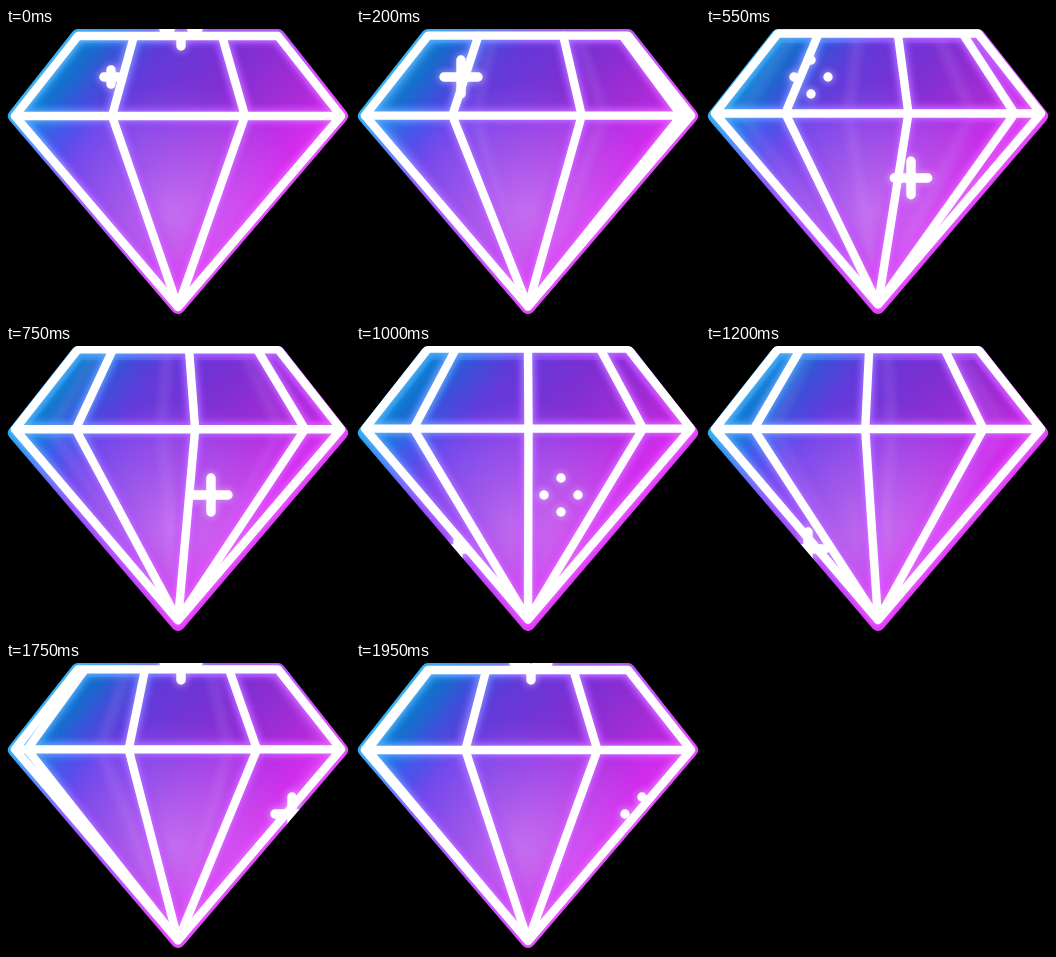
Recreate the animation shown at these times as an HTML page. Size 344 by 289 pixels, loop 2 s.

```html
<!DOCTYPE html>
<html lang="en">
<head>
<meta charset="utf-8">
<title>Spinning diamond</title>
<style>
  html, body { margin: 0; width: 100%; height: 100%; overflow: hidden; background: #000; }
  svg { display: block; width: 100vw; height: 100vh; }
  path { fill: none; stroke-linecap: round; stroke-linejoin: round; }
</style>
</head>
<body>
<svg viewBox="0 0 344 289" preserveAspectRatio="none">
  <defs>
    <linearGradient id="hue" gradientUnits="userSpaceOnUse" x1="43" y1="34" x2="242" y2="192">
      <stop offset="0" stop-color="#0aa2e6"/>
      <stop offset=".1" stop-color="#147cdc"/>
      <stop offset=".2" stop-color="#4458ea"/>
      <stop offset=".32" stop-color="#6c42ea"/>
      <stop offset=".57" stop-color="#8c36e2"/>
      <stop offset=".8" stop-color="#b232e2"/>
      <stop offset="1" stop-color="#d82cf0"/>
    </linearGradient>
    <linearGradient id="rim" gradientUnits="userSpaceOnUse" x1="43" y1="34" x2="242" y2="192">
      <stop offset="0" stop-color="#18a8f0"/>
      <stop offset=".15" stop-color="#3c84fc"/>
      <stop offset=".35" stop-color="#8a4cff"/>
      <stop offset=".7" stop-color="#b83cff"/>
      <stop offset="1" stop-color="#e034fa"/>
    </linearGradient>
    <linearGradient id="shade" x1="0" y1="0" x2="0" y2="1">
      <stop offset="0" stop-color="#200060" stop-opacity=".14"/>
      <stop offset=".27" stop-color="#200060" stop-opacity=".1"/>
      <stop offset=".34" stop-color="#200060" stop-opacity="0"/>
    </linearGradient>
    <radialGradient id="light" gradientUnits="userSpaceOnUse" cx="168" cy="185" r="130">
      <stop offset="0" stop-color="#e0b0ff" stop-opacity=".46"/>
      <stop offset="1" stop-color="#e0b0ff" stop-opacity="0"/>
    </radialGradient>
    <filter id="soft" filterUnits="userSpaceOnUse" x="-20" y="-20" width="384" height="329">
      <feGaussianBlur stdDeviation="3"/>
    </filter>
    <mask id="body" maskUnits="userSpaceOnUse" x="0" y="0" width="344" height="289">
      <path class="gem" style="fill:#fff" stroke="#fff" stroke-width="14"/>
    </mask>
  </defs>
  <rect width="344" height="289" fill="#000"/>
  <path class="gem" style="fill:url(#hue)" stroke="url(#rim)" stroke-width="14"/>
  <path class="gem" style="fill:url(#shade)"/>
  <path class="gem" style="fill:url(#light)"/>
  <g mask="url(#body)">
    <path id="back" stroke="#d9a8ff" stroke-width="12" opacity=".13" filter="url(#soft)"/>
    <g filter="url(#soft)">
      <path class="edges" stroke="url(#rim)" stroke-width="17" opacity=".8"/>
      <path class="edges" stroke="#fff" stroke-width="9" opacity=".3"/>
      <path class="sparks" stroke="#e0b8ff" stroke-width="13" opacity=".5"/>
    </g>
    <path class="edges" stroke="#fff" stroke-width="8.4"/>
    <path class="sparks" stroke="#fff" stroke-width="9.4"/>
  </g>
</svg>
<script>
const LOOP = 2000, STEP = 50, SPARKLE_LIFE = 622;
const girdle = [9, 106, 239, 335];
const crown = [72, 128, 216, 272];
// x, y, birth time
const sparkles = [[105, 49, 1955], [205, 150, 385], [102, 204, 950], [286, 152, 1372], [175, 1, 1560]];

const draw = (selector, d) =>
  document.querySelectorAll(selector).forEach(el => el.setAttribute('d', d));
const mix = (a, b, k) => a + (b - a) * k;
const easeOut = k => 1 - (1 - Math.min(1, Math.max(0, k))) ** 2;

const outline = lift =>
  `M72 ${8 - lift}H272L335 ${88 - lift}L172 ${279 - lift}L9 ${88 - lift}Z`;

function facets(from, to, k, lift) {
  return [0, 1, 2].map(i => {
    const a = i + from, b = i + to;
    return `M${mix(crown[a], crown[b], k)} ${8 - lift}` +
      `L${mix(girdle[a], girdle[b], k)} ${88 - lift}L172 ${279 - lift}`;
  }).join('');
}

function sparkle([x, y, birth], time) {
  const age = (time - birth + LOOP) % LOOP;
  if (age > SPARKLE_LIFE) return '';
  const outer = 17 * easeOut(age / 190);
  const inner = Math.min(outer - .01, 17 * easeOut((age - 350) / 230));
  return [[1, 0], [-1, 0], [0, 1], [0, -1]].map(([dx, dy]) =>
    `M${x + dx * inner} ${y + dy * inner}L${x + dx * outer} ${y + dy * outer}`).join('');
}

function render(time) {
  const k = time / LOOP;
  const lift = 2.2 * (1 - Math.cos(2 * Math.PI * k));
  draw('.edges', outline(lift) + `M9 ${88 - lift}H335` + facets(1, 0, k, lift));
  draw('#back', facets(0, 1, k, lift));
  draw('.sparks', sparkles.map(s => sparkle(s, time)).join(''));
}

draw('.gem', outline(0));
const start = performance.now();
function tick() {
  const time = (performance.now() - start) % LOOP;
  render(Math.floor(time / STEP) * STEP);
  requestAnimationFrame(tick);
}
tick();
</script>
</body>
</html>
```
